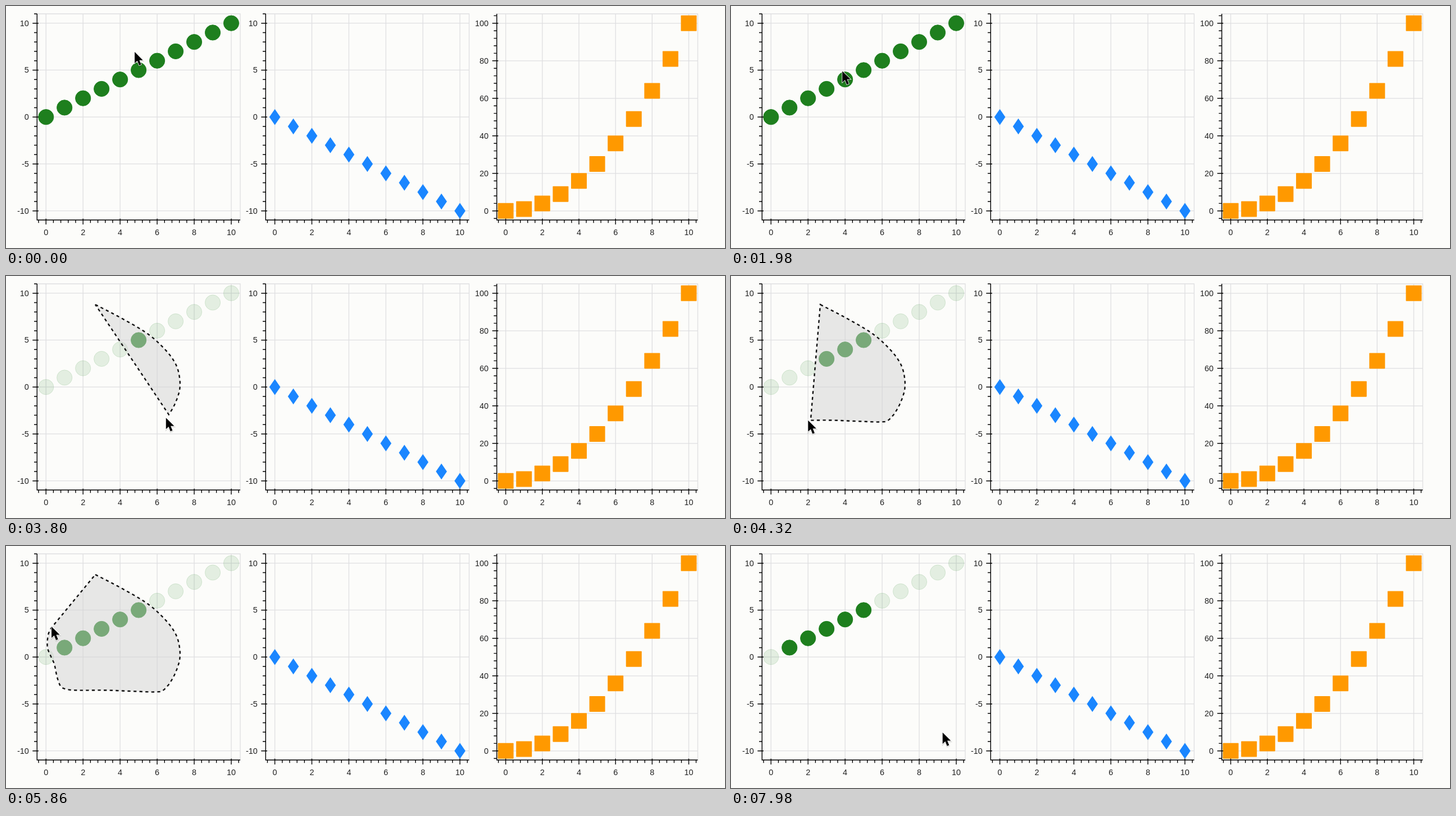
Write an HTML page that moves like this. It is 1280 by 432 pixels and loops after 8000 ms.

```html
<!DOCTYPE html>
<html lang="en">
<head>
<meta charset="utf-8">
<title>Lasso selection</title>
<style>
  html, body { margin: 0; width: 100%; height: 100%; overflow: hidden; background: #fcfcfa; }
  svg { display: block; width: 1280px; height: 432px; }
  text { font: 14.4px "Liberation Sans", Arial, sans-serif; fill: #222; }
  .grid { stroke: #dfdfe1; stroke-width: 1.3; fill: none; }
  .axis { stroke: #000; stroke-width: 1.4; fill: none; }
  .dot { fill: #1e7f1e; stroke: #1e7f1e; stroke-width: 1; }
  .dot.faded { fill-opacity: .11; stroke-opacity: .13; }
  #lasso { fill: #d3d3d3; fill-opacity: .5; stroke: #111; stroke-width: 2.4; stroke-dasharray: 5.3 5.3; }
</style>
</head>
<body>
<svg viewBox="0 0 1280 432">
  <g id="plots"></g>
  <polygon id="lasso"/>
  <g id="cursor">
    <path d="M0 2V22L4.7 17.6 8 25.6 12 24 8.7 16.2H15Z" fill="#000" opacity=".12" stroke="#000" stroke-width="2"/>
    <path d="M0 0V20.2L4.7 15.8 8 24 11.6 22.5 8.3 14.6H14.6Z" fill="#000" stroke="#fff" stroke-width="1.6" paint-order="stroke"/>
  </g>
</svg>
<script>
const NS = 'http://www.w3.org/2000/svg';
const LOOP = 8000, START = 3080, RELEASE = 7200, LAG = 20, STEP = 20;
const TOP = 14, BOTTOM = 382;
const root = document.getElementById('plots');
const lasso = document.getElementById('lasso');
const cursor = document.getElementById('cursor');

function add(name, attrs, text) {
  const el = document.createElementNS(NS, name);
  for (const key in attrs) el.setAttribute(key, attrs[key]);
  if (text !== undefined) el.textContent = text;
  root.appendChild(el);
  return el;
}

const line = (cls, d) => add('path', { class: cls, d });

function drawPlot(p) {
  const px = v => p.x0 + v * p.dx;
  const py = v => p.y0 - v * p.dy;
  let grid = `M${p.left} ${TOP}H${p.right}V${BOTTOM}H${p.left}Z`;
  let axis = `M${p.left} ${TOP}V${BOTTOM + .7}M${p.left - .7} ${BOTTOM}H${p.right}`;

  for (let i = -1; i <= 26; i++) {
    const x = px(i * .4);
    const major = i % 5 === 0;
    axis += `M${x} ${major ? BOTTOM - 2.6 : BOTTOM}V${BOTTOM + (major ? 8 : 5.3)}`;
    if (major) grid += `M${x} ${TOP}V${BOTTOM}`;
  }
  const minor = p.step / 5;
  for (let i = -10; i <= 27; i++) {
    const y = py(i * minor);
    if (y < TOP - .5 || y > BOTTOM + .5) continue;
    const major = i % 5 === 0;
    axis += `M${p.left + (major ? 2.6 : 0)} ${y}H${p.left - (major ? 8 : 5.3)}`;
    if (major) grid += `M${p.left} ${y}H${p.right}`;
  }
  line('grid', grid);

  const marks = [];
  for (let i = 0; i <= 10; i++) marks.push(p.mark(px(i), py(p.f(i))));
  line('axis', axis);

  for (let v = 0; v <= 10; v += 2)
    add('text', { x: px(v), y: 408.6, 'text-anchor': 'middle' }, v);
  for (let v = p.min; v <= p.max; v += p.step)
    add('text', { x: p.left - 14.6, y: py(v) + 5, 'text-anchor': 'end' }, v);
  return marks;
}

const dots = drawPlot({
  left: 55.3, right: 417, x0: 71.2, dx: 32.98, y0: 198.2, dy: 16.75,
  min: -10, max: 10, step: 5, f: v => v,
  mark: (x, y) => ({ x, y, el: add('circle', { class: 'dot', cx: x, cy: y, r: 13.6 }) })
});
drawPlot({
  left: 462.3, right: 824.5, x0: 478.6, dx: 32.95, y0: 198.2, dy: 16.75,
  min: -10, max: 10, step: 5, f: v => -v,
  mark: (x, y) => add('path', { d: `M${x} ${y - 14.3}l9.8 14.3 -9.8 14.3 -9.8 -14.3Z`, fill: '#1a86ff' })
});
drawPlot({
  left: 873.7, right: 1231.5, x0: 889.6, dx: 32.59, y0: 365.8, dy: 3.35,
  min: 0, max: 100, step: 20, f: v => v * v,
  mark: (x, y) => add('rect', { x: x - 14, y: y - 14, width: 28, height: 28, rx: .8, fill: '#ff9900' })
});

// Pointer track: time, x, y
const track = [
  [0, 229, 82], [400, 262, 94], [820, 268, 112], [1200, 232, 121], [1500, 188, 92],
  [1700, 182, 88], [1980, 198, 116], [2220, 290, 200], [2420, 268, 150], [2700, 200, 75],
  [2960, 164, 53], [3080, 159, 51], [3220, 205, 75], [3360, 252, 103], [3480, 283, 131],
  [3580, 302, 157], [3650, 309, 181], [3700, 309, 205], [3740, 300, 230], [3780, 290, 247],
  [3800, 285, 253], [3860, 274, 260], [3980, 232, 259.5], [4150, 180, 257.5], [4380, 125, 257.5],
  [4540, 105, 255], [4640, 97, 250], [4760, 91.5, 236], [4780, 90, 230], [4930, 86, 211],
  [5120, 79, 195], [5300, 74.5, 184], [5480, 73.5, 172], [5660, 75.5, 157], [5840, 80, 147],
  [5860, 81, 144], [6100, 100, 116], [6350, 125, 82], [6600, 150, 54], [6850, 158, 51],
  [7200, 158, 51], [7500, 215, 120], [7860, 376, 332], [8000, 376, 332]
];

function slope(i, k) {
  const a = track[Math.max(i - 1, 0)], b = track[Math.min(i + 1, track.length - 1)];
  return (b[k] - a[k]) / (b[0] - a[0]);
}

function pointer(t) {
  let i = 0;
  while (i < track.length - 2 && track[i + 1][0] <= t) i++;
  const a = track[i], b = track[i + 1], h = b[0] - a[0];
  const u = (t - a[0]) / h, u2 = u * u, u3 = u2 * u;
  return [1, 2].map(k =>
    (2 * u3 - 3 * u2 + 1) * a[k] + (u3 - 2 * u2 + u) * h * slope(i, k) +
    (3 * u2 - 2 * u3) * b[k] + (u3 - u2) * h * slope(i + 1, k));
}

function outline(t) {
  const end = Math.min(t, RELEASE) - LAG, pts = [];
  if (end <= START) return pts;
  for (let s = START; s < end; s += STEP) pts.push(pointer(s));
  pts.push(pointer(end));
  return pts;
}

function inside(x, y, pts) {
  let hit = false;
  pts.forEach(([ax, ay], i) => {
    const [bx, by] = pts[(i + 1) % pts.length];
    if (ay > y !== by > y && x < ax + (y - ay) / (by - ay) * (bx - ax)) hit = !hit;
  });
  return hit;
}

function render(t) {
  const pts = outline(t);
  const picked = dots.map(d => inside(d.x, d.y, pts));
  const any = picked.includes(true);
  dots.forEach((d, i) => d.el.classList.toggle('faded', any && !picked[i]));
  const shown = t < RELEASE && pts.length > 1;
  lasso.setAttribute('points', shown ? pts.map(p => p.map(v => v.toFixed(2))).join(' ') : '');
  cursor.setAttribute('transform', `translate(${pointer(t)})`);
}

const begin = performance.now();
function tick() {
  render((performance.now() - begin) % LOOP);
  requestAnimationFrame(tick);
}
tick();
</script>
</body>
</html>
```
